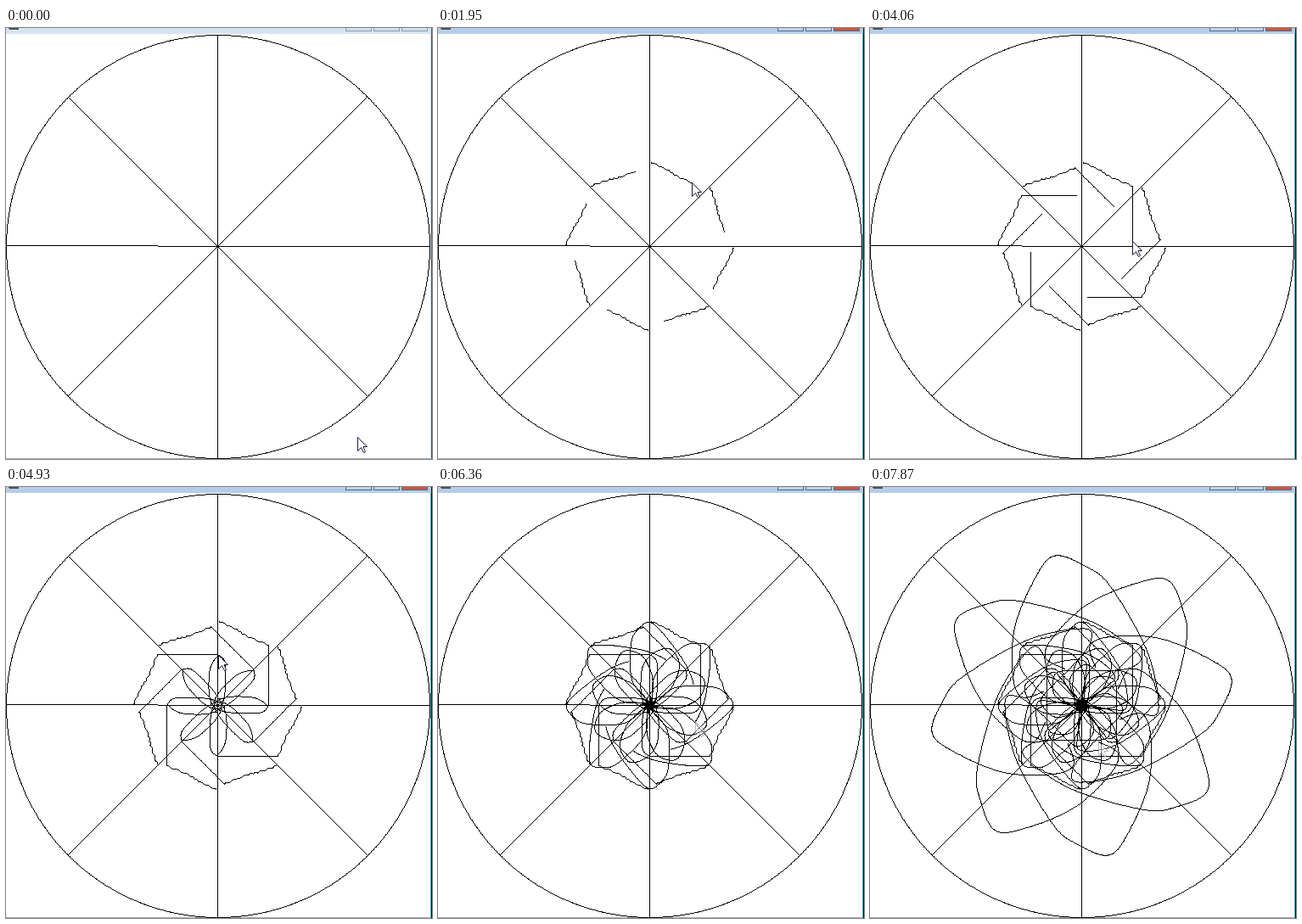
An HTML page with a canvas that plays this animation: 502x508 px, repeating every 8000 ms.

```html
<!DOCTYPE html>
<html>
<head>
<meta charset="utf-8">
<style>
  html, body { margin: 0; width: 502px; height: 508px; overflow: hidden; background: #fff; }
  canvas { display: block; }
</style>
</head>
<body>
<canvas id="stage" width="502" height="508"></canvas>
<script>
const ctx = document.getElementById('stage').getContext('2d');
const LOOP = 8000, CX = 249, CY = 257, SUB = 12;

const moves = [];
let pen = [414, 482];

// Adds a mouse move from the current position through the waypoints x, y, ...
function move(start, end, ...flat) {
  const path = smooth([...pen, ...flat]);
  pen = flat.slice(-2);
  moves.push({ start, end, steps: Math.round((end - start) / 80), path });
}

// Catmull-Rom curve through the waypoints
function smooth(flat) {
  const n = flat.length / 2, out = [];
  const at = (i, k) => flat[2 * Math.max(0, Math.min(n - 1, i)) + k];
  for (let i = 0; i < n - 1; i++) {
    for (let s = 0; s < SUB; s++) {
      const u = s / SUB;
      out.push([0, 1].map(k => {
        const a = at(i - 1, k), b = at(i, k), c = at(i + 1, k), d = at(i + 2, k);
        return b + u * (c - a + u * (2 * a - 5 * b + 4 * c - d + u * (3 * (b - c) + d - a))) / 2;
      }));
    }
  }
  out.push(flat.slice(-2));
  return out;
}

move(-8, 850, 251, 158);
move(1470, 2030, 270, 167, 283, 175, 309, 186);
move(3270, 3830, 309, 244);
move(3980, 4140, 309, 257);
move(4610, 5410, 296, 266, 246, 260, 239, 220, 250, 198,
  272, 190, 284, 208, 277, 232, 264, 247, 255, 254, 250, 258);
move(5640, 5720, 257, 250, 252, 255);
move(5880, 6680, 255, 222, 285, 190, 304, 184, 320, 192, 315, 245, 303, 276,
  284, 296, 272, 287, 262, 273, 252, 259);
move(6760, 6840, 238, 288, 213, 289, 208, 276);
move(7150, 7870, 208, 225, 203, 196, 187, 191, 150, 246, 126, 331, 130, 370, 148, 405,
  188, 400, 241, 377, 281, 340, 292, 314, 269, 300);

// The first drawn line is shaky
moves[1].path.forEach((p, i) => { p[1] += .8 * Math.sin(i * 1.3); });

function rect(color, x, y, w, h) {
  ctx.fillStyle = color;
  ctx.fillRect(x, y, w, h);
}

// Hard-edged one pixel line
function line(x0, y0, x1, y1) {
  const n = Math.max(1, Math.ceil(Math.max(Math.abs(x1 - x0), Math.abs(y1 - y0))));
  for (let i = 0; i <= n; i++) {
    ctx.fillRect(Math.round(x0 + (x1 - x0) * i / n), Math.round(y0 + (y1 - y0) * i / n), 1, 1);
  }
}

function drawWindow(active) {
  rect('#fff', 0, 0, 502, 508);
  rect(active ? '#b4cee9' : '#d6e4f2', 0, 0, 502, 7);
  rect('#505050', 3, 0, 12, 1);
  rect('#505050', 4, 1, 11, 1);
  [400, 433, 466].forEach((x, i) => {
    rect(active ? '#566b83' : '#8b9cad', x, 0, 31, 4);
    rect(active ? (i === 2 ? '#d0533c' : '#bdd2e8') : '#d3e0ed', x + 1, 0, 29, 3);
  });
  rect(active ? '#35bcd9' : '#d6e4f2', 500, 7, 1, 501);
  rect(active ? '#111' : '#555', 501, 0, 1, 508);
  rect('#aaa', 0, 507, 500, 1);
}

function drawWheel() {
  ctx.fillStyle = '#000';
  const rim = a => [249.5 + 249.5 * Math.cos(a), 257.5 + 249.5 * Math.sin(a)];
  for (let i = 0; i < 360; i++) {
    line(...rim(i * Math.PI / 180), ...rim((i + 1) * Math.PI / 180));
  }
  line(249, 8, 248.6, 507);
  line(0, 256, 499, 257.4);
  line(73, 81, 425, 433);
  line(425, 81, 73, 433);
}

function drawStroke(path, last) {
  for (let k = 0; k < 8; k++) {
    const c = Math.cos(k * Math.PI / 4), s = Math.sin(k * Math.PI / 4);
    const turn = ([x, y]) => [CX + (x - CX) * c - (y - CY) * s, CY + (x - CX) * s + (y - CY) * c];
    for (let i = 1; i <= last; i++) line(...turn(path[i - 1]), ...turn(path[i]));
  }
}

function drawCursor([x, y], faint) {
  ctx.save();
  ctx.translate(Math.round(x) + .5, Math.round(y) + .5);
  ctx.beginPath();
  [[0, 0], [0, 16], [4, 12], [7, 18], [9, 17], [6.5, 11], [11, 11]].forEach(p => ctx.lineTo(...p));
  ctx.closePath();
  ctx.globalAlpha = faint ? .5 : 1;
  ctx.fillStyle = '#fff';
  ctx.strokeStyle = faint ? '#776e8c' : '#1c1c3c';
  ctx.fill();
  ctx.stroke();
  ctx.restore();
}

function draw(t) {
  drawWindow(t >= 1160);
  drawWheel();
  let tip;
  moves.forEach(({ start, end, steps, path }, i) => {
    if (t < start) return;
    const done = Math.min(steps, Math.floor((t - start) / (end - start) * steps + .01)) / steps;
    const last = Math.round(done * (path.length - 1));
    if (i > 0) drawStroke(path, last);
    tip = path[last];
  });
  drawCursor(tip, t >= 5880);
}

const began = performance.now();
function tick() {
  draw((performance.now() - began) % LOOP);
  requestAnimationFrame(tick);
}
tick();
</script>
</body>
</html>
```
